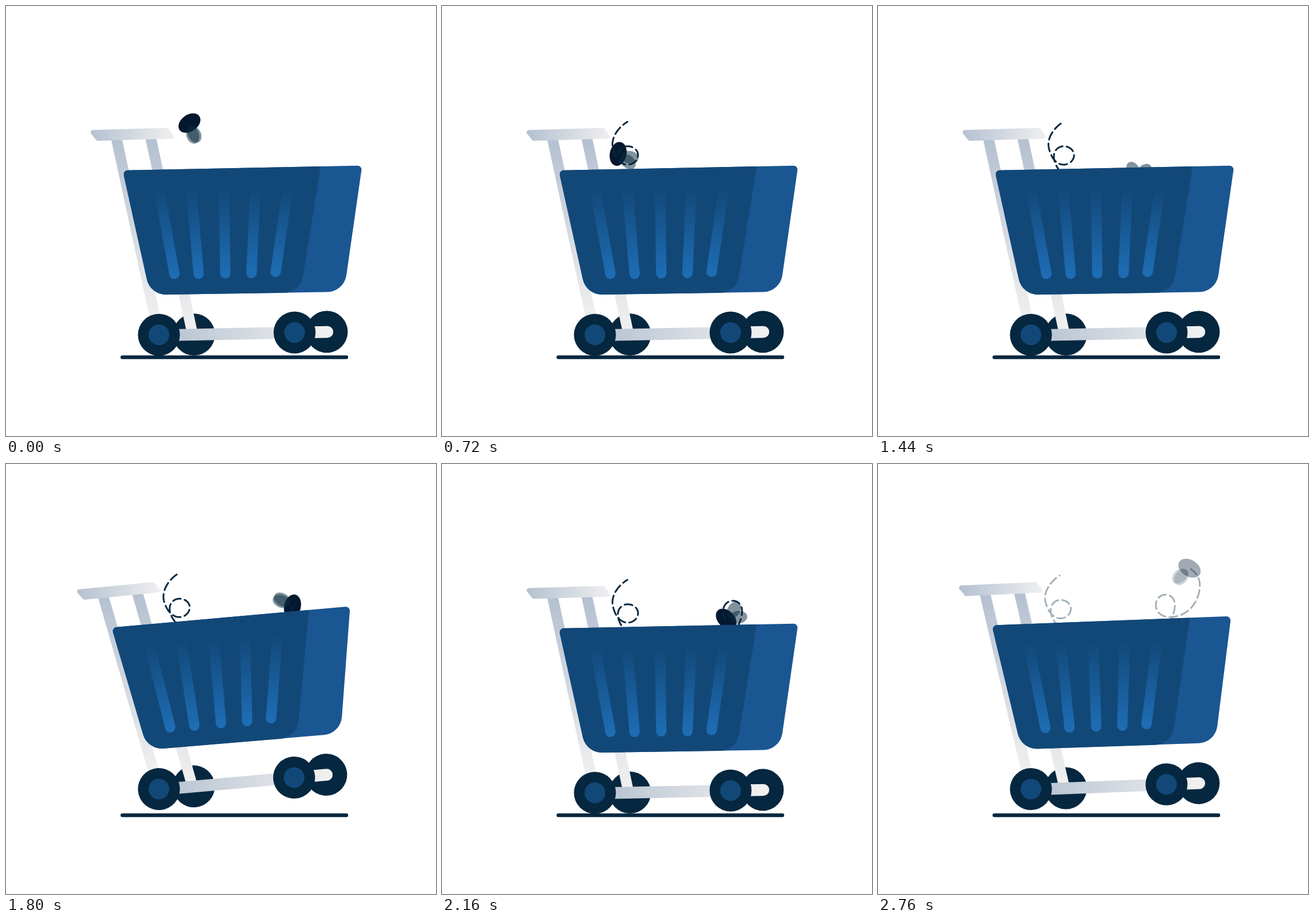
Write an HTML page with a canvas that moves like this. It is 748 px wide and 748 px high and loops after 2800 ms.

```html
<!DOCTYPE html>
<html lang="en">
<head>
<meta charset="utf-8">
<title>Rolling cart</title>
<style>
  html, body { margin: 0; width: 100%; height: 100%; overflow: hidden; background: #fff; }
  canvas { display: block; width: 748px; height: 748px; }
</style>
</head>
<body>
<canvas id="stage" width="748" height="748"></canvas>
<script>
const ctx = document.getElementById('stage').getContext('2d');
const LOOP = 2800, FRAME = 40;
const NAVY = '#05273f', BODY = '#04182f', FRONT = '#124878', SIDE = '#1a5692', SLOT = '#1e6cb3';
const STEEL = '#b4c0d0', LIGHT = '#f0f0f0';
const PIVOT = { x: 266, y: 572 };

// Flight path in cart coordinates: loop, dip into the basket, loop, fly off.
const flight = document.createElementNS('http://www.w3.org/2000/svg', 'path');
flight.setAttribute('d',
  'M322.5 201.5 C305 212 292 232 298 250 C302 266 312 276 323 276 ' +
  'C333 276 341 268 341 259.5 C341 251 333 244 323 244 C313 244 306 252 306 261 ' +
  'C306 271 310 278 314 284 C328 314 500 312 512 288 C518 276 522 266 522 256 ' +
  'C522 245 515 238 506 238 C496 238 489 246 489 256 C489 268 498 276 512 277 ' +
  'C545 278 566 250 566 222 C566 208 558 196 540 188');
const flightLength = flight.getTotalLength();
const trail = Array.from({ length: Math.floor(flightLength) + 1 }, (_, i) => flight.getPointAtLength(i));

const clamp = (v, lo, hi) => Math.min(hi, Math.max(lo, v));
const smooth = u => u * u * (3 - 2 * u);
// Eased 0 -> 1 -> 0 over one period.
const swing = (t, period) => smooth(1 - Math.abs(1 - 2 * ((t / period) % 1)));

function gradient(x0, y0, x1, y1, from, to) {
  const g = ctx.createLinearGradient(x0, y0, x1, y1);
  g.addColorStop(0, from);
  g.addColorStop(1, to);
  return g;
}

function line(x0, y0, x1, y1, width, style, cap = 'butt') {
  ctx.beginPath();
  ctx.moveTo(x0, y0);
  ctx.lineTo(x1, y1);
  ctx.lineWidth = width;
  ctx.lineCap = cap;
  ctx.strokeStyle = style;
  ctx.stroke();
}

function disc(x, y, r, fill) {
  ctx.beginPath();
  ctx.arc(x, y, r, 0, 2 * Math.PI);
  ctx.fillStyle = fill;
  ctx.fill();
}

// Closed polygon with corners given as [x, y, radius].
function roundedShape(corners, fill) {
  const [ax, ay] = corners[corners.length - 1];
  const [bx, by] = corners[0];
  ctx.beginPath();
  ctx.moveTo((ax + bx) / 2, (ay + by) / 2);
  corners.forEach(([x, y, r], i) => {
    const [nx, ny] = corners[(i + 1) % corners.length];
    ctx.arcTo(x, y, nx, ny, r);
  });
  ctx.closePath();
  ctx.fillStyle = fill;
  ctx.fill();
}

function pole(x, y, x1, y1) {
  ctx.beginPath();
  ctx.moveTo(x, y);
  ctx.lineTo(x + 19, y);
  ctx.lineTo(x1 + 19, y1);
  ctx.lineTo(x1, y1);
  ctx.fillStyle = gradient(x, y, x1, y1, STEEL, LIGHT);
  ctx.fill();
}

function drawFrame() {
  disc(327, 571.5, 36.5, NAVY);
  disc(558, 566.8, 36.5, NAVY);
  pole(182.5, 230, 250.5, 545);
  pole(242.5, 230, 313.5, 564);
  roundedShape([[143, 216, 4], [282, 212, 5], [295, 230.5, 3], [158, 234.5, 4]],
    gradient(145, 0, 294, 0, STEEL, LIGHT));
  const steel = gradient(285, 0, 555, 0, '#b8c3d2', LIGHT);
  line(285, 572.5, 500, 568.2, 20.5, steel);
  line(500, 568.2, 559, 567, 20.5, steel, 'round');
}

function drawBasket() {
  roundedShape([[203, 286, 7], [619.5, 277.5, 7], [588, 497, 34], [251, 502.5, 34]], SIDE);
  roundedShape([[203, 286, 7], [547.5, 279, 0], [512, 498.7, 34], [251, 502.5, 34]], FRONT);
  const slots = [[265, 293, 466], [322, 335, 466], [379, 381.5, 465], [434, 427, 464.5], [491, 469, 462.5]];
  for (const [top, foot, y] of slots) {
    line(top, 312, foot, y, 18, gradient(top, 316, foot, y, 'rgba(30,108,179,0)', SLOT), 'round');
  }
}

function drawWheels() {
  for (const [x, y] of [[266, 572], [502, 568]]) {
    disc(x, y, 36.5, NAVY);
    disc(x, y, 18, FRONT);
  }
}

function drawFly(t, s) {
  const p = flight.getPointAtLength(s);
  const a = flight.getPointAtLength(Math.max(0, s - 2));
  const b = flight.getPointAtLength(Math.min(flightLength, s + 2));
  ctx.save();
  ctx.translate(p.x, p.y);
  ctx.rotate(Math.atan2(b.y - a.y, b.x - a.x));
  ctx.fillStyle = BODY;
  ctx.beginPath();
  ctx.ellipse(0, 0, 21, 14.5, 0, 0, 2 * Math.PI);
  ctx.fill();

  const spread = 40 + 31 * Math.cos(2 * Math.PI * t * 3 / 320 + 3.53);
  ctx.translate(2, -4);
  ctx.fillStyle = 'rgba(6,40,63,0.5)';
  for (const side of [-1, 1]) {
    ctx.save();
    ctx.rotate((-78 + side * spread / 2) * Math.PI / 180);
    ctx.beginPath();
    ctx.ellipse(17, 0, 15.5, 11, 0, 0, 2 * Math.PI);
    ctx.fill();
    ctx.restore();
  }
  ctx.restore();
}

function drawTrail(t, s) {
  ctx.save();
  ctx.setLineDash([14, 7]);
  ctx.lineDashOffset = -5.5 + 21 * t / 1440;
  ctx.lineWidth = 3;
  ctx.strokeStyle = NAVY;
  ctx.beginPath();
  trail.slice(0, Math.floor(s) + 1).forEach(p => ctx.lineTo(p.x, p.y));
  ctx.stroke();
  ctx.restore();
}

function draw(t) {
  ctx.fillStyle = '#fff';
  ctx.fillRect(0, 0, 748, 748);
  line(202.5, 611, 592, 611, 6.5, NAVY, 'round');

  const tilt = -3.9 * swing(t, 720) * Math.PI / 180;
  const lift = 6.5 * swing(t, 240);
  const flown = Math.min(flightLength, 4 + 0.2355 * t);

  ctx.save();
  ctx.translate(PIVOT.x, PIVOT.y - lift);
  ctx.rotate(tilt);
  ctx.translate(-PIVOT.x, -PIVOT.y);

  drawFrame();
  ctx.globalAlpha = clamp((2840 - t) / 220, 0, 1);
  drawFly(t, flown);
  drawTrail(t, flown);
  ctx.globalAlpha = 1;
  drawBasket();
  drawWheels();
  ctx.restore();
}

const start = performance.now();
function tick() {
  const t = (performance.now() - start) % LOOP;
  draw(Math.floor(t / FRAME) * FRAME);
  requestAnimationFrame(tick);
}
tick();
</script>
</body>
</html>
```
